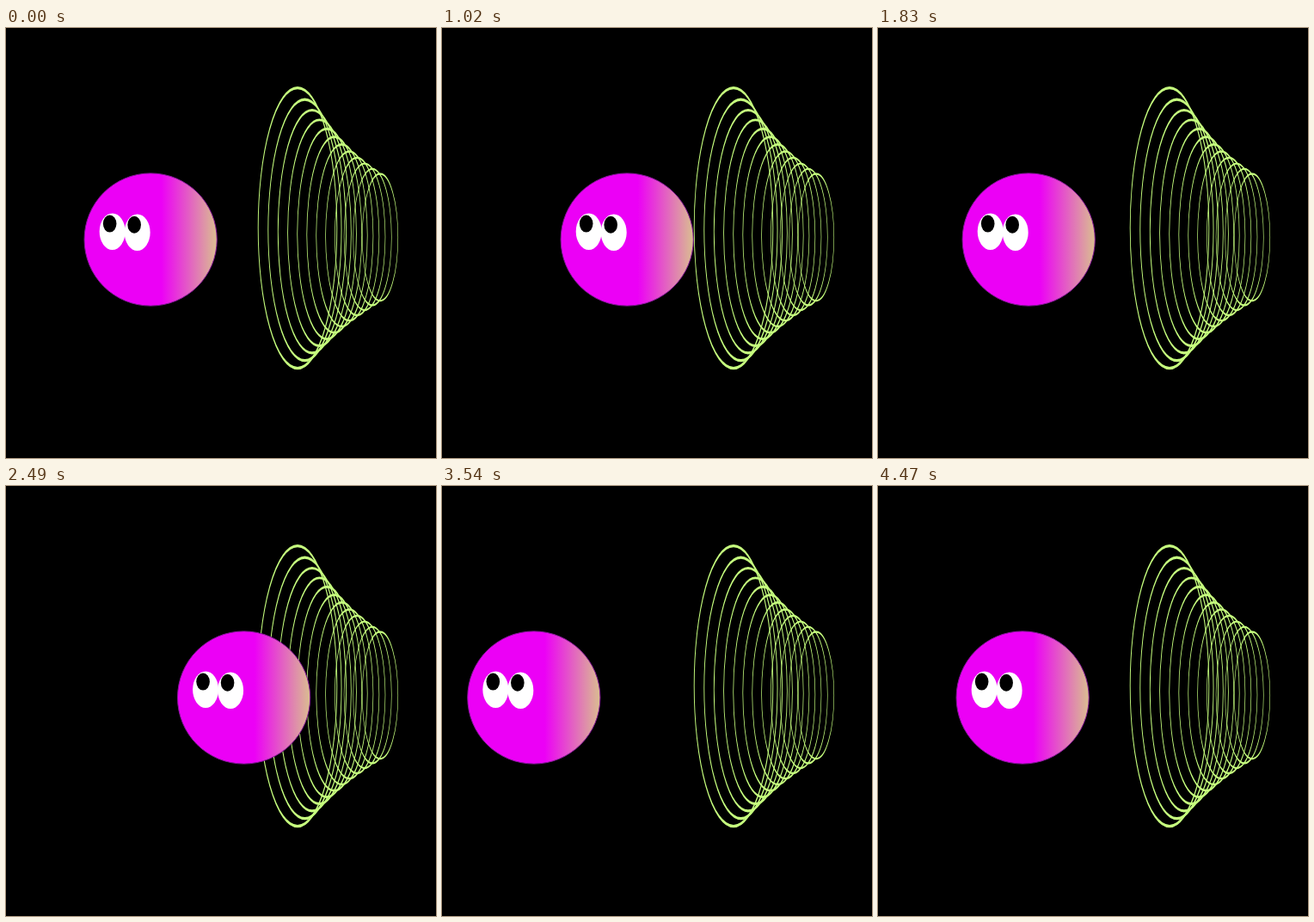
Animation, 500 px wide and 500 px high, one loop 4500 ms. Source, as an HTML page:

```html
<!DOCTYPE html>
<html lang="en">
<head>
<meta charset="utf-8">
<title>Ball and rings</title>
<style>
  html, body { margin: 0; width: 100%; height: 100%; overflow: hidden; background: #000; }
  svg { display: block; width: 100vw; height: 100vh; }
</style>
</head>
<body>
<svg viewBox="0 0 500 500">
  <defs>
    <linearGradient id="skin">
      <stop offset="0.58" stop-color="#ec00f6"/>
      <stop offset="1" stop-color="#dabf90"/>
    </linearGradient>
  </defs>
  <g id="rings" fill="none" stroke="#c6ff7e"></g>
  <g id="ball">
    <circle cx="77.5" cy="246" r="77.1" fill="url(#skin)" stroke="#86189a" stroke-width="1"/>
    <g fill="#fff">
      <ellipse cx="33" cy="236.7" rx="15" ry="21.3"/>
      <ellipse cx="62" cy="237.7" rx="15" ry="21.3"/>
    </g>
    <ellipse cx="30" cy="227.6" rx="7.8" ry="10"/>
    <ellipse cx="58.5" cy="228.8" rx="7.8" ry="10"/>
  </g>
</svg>
<script>
  const STEP = 30, LOOP = 4500;

  // [time, left edge of the ball, ease influence towards the next key]
  const keys = [
    [-900, 29, 0.25],
    [880, 150.5, 1 / 3],
    [1500, 52, 1 / 3],
    [2400, 202, 1 / 3],
    [3570, 29, 0.25],
    [5350, 150.5, 0]
  ];

  // Symmetric cubic-bezier(a, 0, 1 - a, 1), solved by bisection.
  function ease(x, a) {
    let lo = 0, hi = 1, s = 0.5;
    for (let i = 0; i < 24; i++) {
      s = (lo + hi) / 2;
      const r = 1 - s;
      const bx = 3 * a * s * r * r + 3 * (1 - a) * s * s * r + s * s * s;
      if (bx < x) lo = s; else hi = s;
    }
    return s * s * (3 - 2 * s);
  }

  function ballX(t) {
    const i = keys.findIndex(k => k[0] > t) - 1;
    const [t0, x0, a] = keys[i], [t1, x1] = keys[i + 1];
    return x0 + (x1 - x0) * ease((t - t0) / (t1 - t0), a);
  }

  // Flattened circles, shrinking towards the narrow end of the horn.
  const rings = document.getElementById('rings');
  for (let i = 0; i < 12; i++) {
    const c = document.createElementNS('http://www.w3.org/2000/svg', 'circle');
    const cx = 339 + 8.4 * i + 0.03 * i * i, cy = 244.6 - 12 * 0.81 ** i;
    c.setAttribute('r', 163 * 0.9305 ** i);
    c.setAttribute('stroke-width', 3.3 * 0.96 ** i);
    c.setAttribute('transform', `translate(${cx} ${cy}) scale(0.281 1)`);
    rings.appendChild(c);
  }

  const ball = document.getElementById('ball');
  const start = performance.now();

  function draw(now) {
    const t = Math.max(0, now - start) % LOOP;
    const x = ballX(Math.floor(t / STEP) * STEP);
    ball.setAttribute('transform', `translate(${x.toFixed(2)} 0)`);
    requestAnimationFrame(draw);
  }
  draw(start);
</script>
</body>
</html>
```
